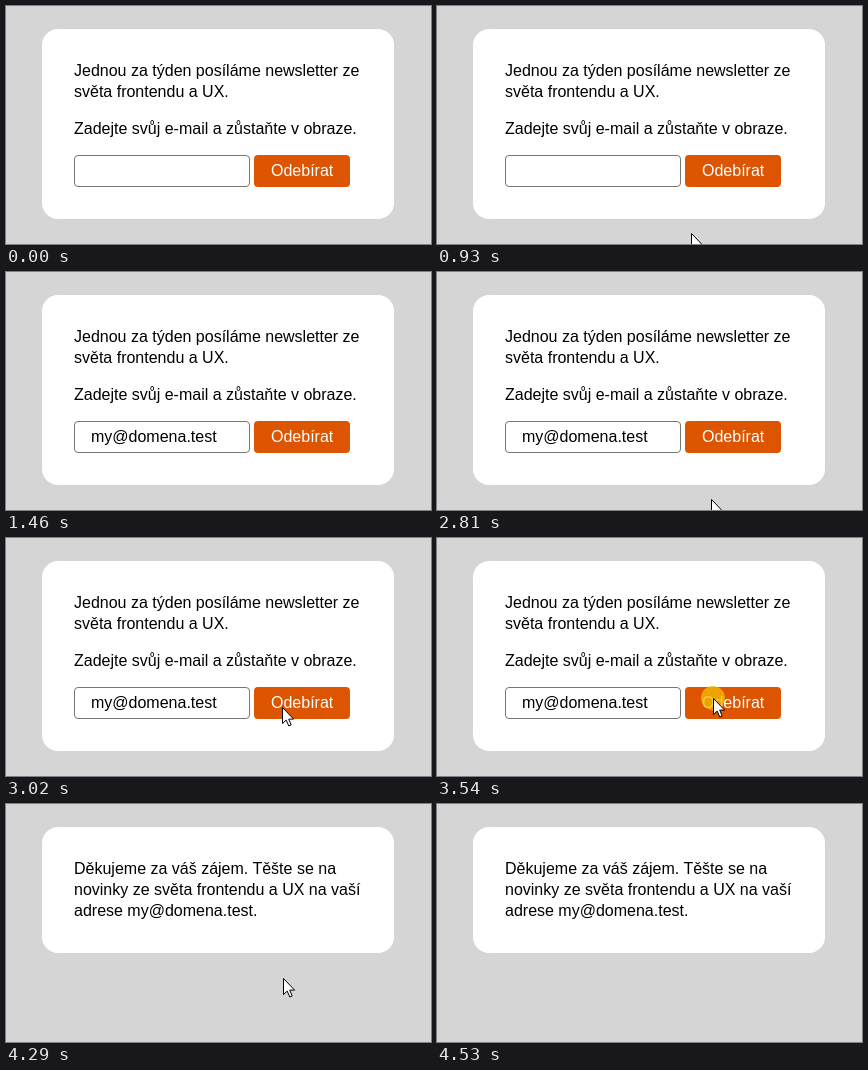
Animation of 425 by 238 pixels, one loop 6.31 s. Source, as an HTML page:

```html
<!DOCTYPE html>
<html lang="cs">
<head>
<meta charset="utf-8">
<title>Newsletter</title>
<style>
  html, body { margin: 0; width: 100%; height: 100%; overflow: hidden; background: #d5d5d5; }
  svg { display: block; width: 100%; height: 100%; }
  text { font: 16px Arial, "Liberation Sans", sans-serif; fill: #000; white-space: pre; }
  .card { fill: #fff; }
  .field { fill: #fff; stroke: #767676; }
  .button { fill: #d50; }
  .label { fill: #fff; }
  .spot { fill: #f2bd00; fill-opacity: .75; }
  .arrow { fill: #fff; stroke: #000; stroke-width: 1; }
  .beam { fill: none; stroke: #000; }
</style>
</head>
<body>
<svg viewBox="0 0 425 238">
  <g id="form">
    <rect class="card" x="36" y="23" width="352" height="190" rx="16"/>
    <text x="68" y="70">Jednou za týden posíláme newsletter ze</text>
    <text x="68" y="91">světa frontendu a UX.</text>
    <text x="68" y="128">Zadejte svůj e-mail a zůstaňte v obraze.</text>
    <rect class="field" x="68.5" y="149.5" width="175" height="31" rx="3.5"/>
    <text id="email" x="85" y="170">my@domena.test</text>
    <rect class="button" x="248" y="149" width="96" height="32" rx="4"/>
    <text class="label" x="265" y="170">Odebírat</text>
  </g>
  <g id="thanks">
    <rect class="card" x="36" y="23" width="352" height="126" rx="16"/>
    <text x="68" y="70">Děkujeme za váš zájem. Těšte se na</text>
    <text x="68" y="91">novinky ze světa frontendu a UX na vaší</text>
    <text x="68" y="112">adrese my@domena.test.</text>
  </g>
  <circle id="spot" class="spot" cy="160" r="12"/>
  <g id="cursor">
    <path id="arrow" class="arrow" d="M.5.5V16.6L4.2 13.1 6.8 19 9.2 18 6.7 12.1H11.6Z"/>
    <path id="beam" class="beam" d="M-1 -6.5H2M.5 -6.5V8.5M-1 8.5H2"/>
  </g>
</svg>
<script>
  const LOOP = 6310;
  const easeOut = p => p * (1.5 - .5 * p);
  const easeIn = p => p * (.5 + .5 * p);

  // Each move holds its last position until `hide`.
  const moves = [
    { start: 930, end: 1190, hide: 1460, steps: 8, from: [254, 227], to: [212, 160], ease: easeOut },
    { start: 2810, end: 3080, hide: 4200, steps: 9, from: [274, 227], to: [276, 160], ease: easeOut },
    { start: 4200, end: 4530, hide: 4530, steps: 11, from: [276, 160], to: [282, 240], ease: easeIn }
  ];
  const clicks = [
    { start: 1390, end: 1460, x: 212 },
    { start: 3540, end: 3690, x: 276 }
  ];

  const el = id => document.getElementById(id);
  const show = (id, on) => { el(id).style.display = on ? '' : 'none'; };

  function position(m, t) {
    const p = Math.min(1, (t - m.start) / (m.end - m.start));
    const e = m.ease(Math.floor(p * m.steps + 1e-6) / m.steps);
    return m.from.map((a, i) => Math.round(a + (m.to[i] - a) * e));
  }

  function render(t) {
    const done = t >= 3690;
    show('form', !done);
    show('thanks', done);
    show('email', t >= 1460);

    const click = clicks.find(c => t >= c.start && t < c.end);
    show('spot', click);
    if (click) el('spot').setAttribute('cx', click.x);

    const move = moves.find(m => t >= m.start && t < m.hide);
    show('cursor', move);
    if (move) {
      const [x, y] = position(move, t);
      const overField = !done && x >= 68 && x < 244 && y >= 149 && y < 181;
      show('beam', overField);
      show('arrow', !overField);
      el('cursor').setAttribute('transform', `translate(${x} ${y})`);
    }
  }

  const began = performance.now();
  function tick() {
    render((performance.now() - began) % LOOP);
    requestAnimationFrame(tick);
  }
  tick();
</script>
</body>
</html>
```
